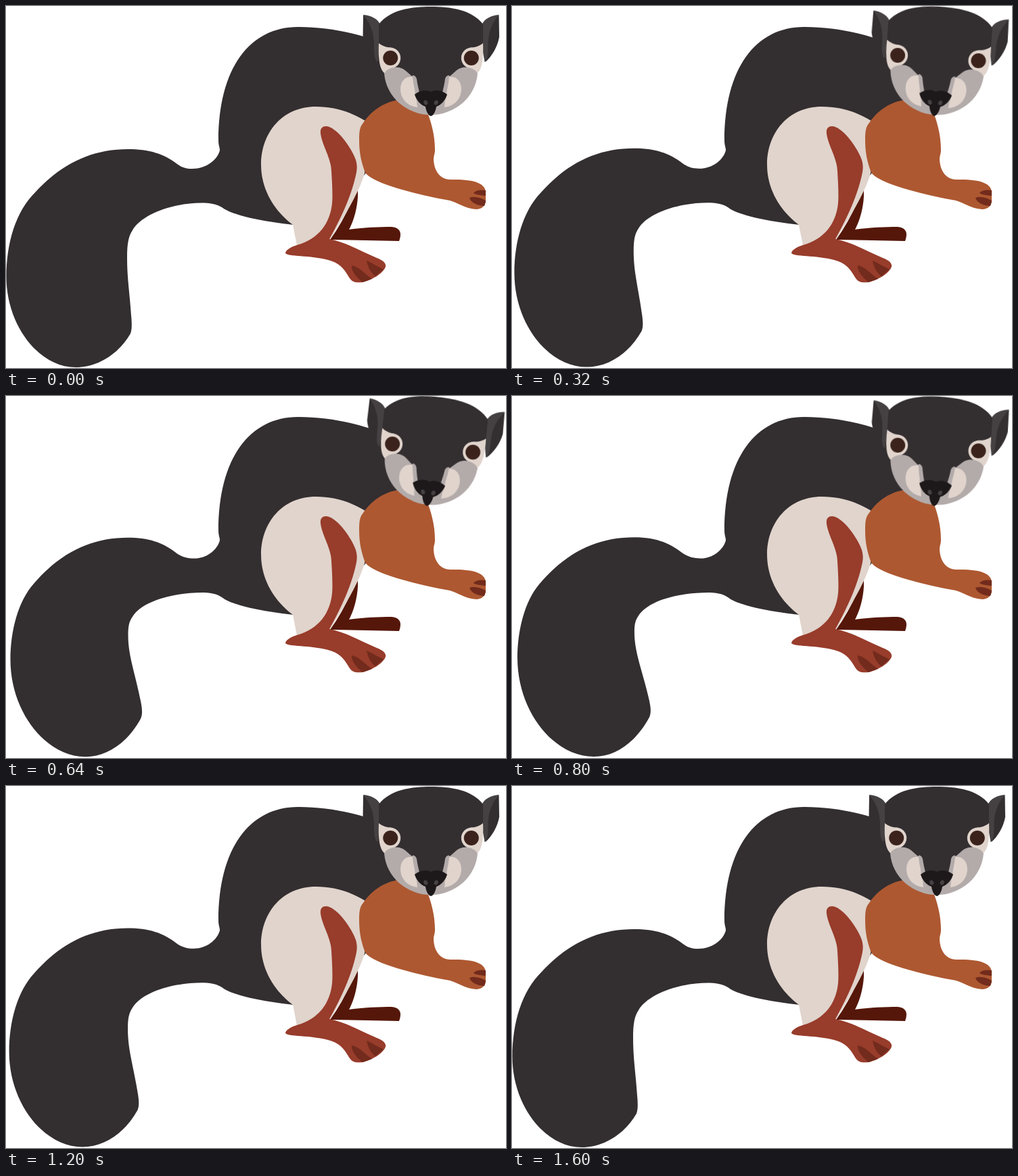
An HTML page that plays this animation: 739x536 px, repeating every 1.72 s.

```html
<!DOCTYPE html>
<html lang="en">
<head>
<meta charset="utf-8">
<title>Squirrel</title>
<style>
  html, body { margin: 0; width: 100%; height: 100%; overflow: hidden; background: #fff; }
  svg { display: block; width: 739px; height: 536px; }

  .dark { fill: #332e30; }
  .grey { fill: #454142; }
  .cream { fill: #e0d4cc; }
  .cheek { fill: #b3abaa; }
  .rust { fill: #983c2b; }
  .claw { fill: #722b1c; }
  .shade { fill: #551709; }
  .orange { fill: #ad5831; }
  .iris { fill: #3b231c; }
  .nose { fill: #1d1819; }

  /* 25 poses per second, stepped */
  #tail {
    d: path("M316 214C312 228 296 241 275 241C266 241 260 239 253 234C234 219 212 212 180 212C126 212 82 234 44 275C14 304 .5 352 .5 401C.5 472 48 535 103 535C135 535 166 516 184 485C186 479 186 474 185.5 464C183 425 179 405 179 372C179 352 181 341 187 332C200 309 246 291 292 291.5C306 292 314 295 319 298L330 296L340 220Z");
    animation: wag 1720ms infinite;
  }
  #head { transform-origin: 628px 103px; animation: tilt 1720ms infinite; }

  @keyframes wag {
    0% { animation-timing-function: steps(21); }
    48.837% {
      d: path("M316 214C312 228 297 240.5 279 240.5C268 240.5 259 238 250 231C231 216 210 209 180 209C126 209 80 231 40 279C19 304 8.4 347 8.4 387C8.4 466 62 534 122 534C155 534 185 511 204 475C207 468 206 460 203.5 449C194 408 181 379 181 349C181 338 182 332 187 325C201 303 245 291 292 291C306 291.5 314 294.5 319 298L330 296L340 220Z");
      animation-timing-function: steps(19);
    }
    93.023%, 100% {
      d: path("M316 214C312 228 296 241 275 241C266 241 260 239 253 234C234 219 212 212 180 212C126 212 82 234 44 275C14 304 .5 352 .5 401C.5 472 48 535 103 535C135 535 166 516 184 485C186 479 186 474 185.5 464C183 425 179 405 179 372C179 352 181 341 187 332C200 309 246 291 292 291.5C306 292 314 295 319 298L330 296L340 220Z");
    }
  }
  @keyframes tilt {
    0% { transform: rotate(0deg); animation-timing-function: steps(14); }
    32.558% { transform: rotate(6.7deg); animation-timing-function: steps(15); }
    67.441%, 100% { transform: rotate(0deg); }
  }
</style>
</head>
<body>
<svg viewBox="0 0 739 536">
  <defs>
    <g id="ear">
      <path class="dark" d="M528 13L527.5 46C530 60 538 74 548 83L546 30Z"/>
      <path class="grey" d="M528 13C540 14 549 19 553 27L553 60L549 83C545 80 544 72 544 60C544 40 540 28 528 13Z"/>
    </g>
    <g id="side">
      <path class="cream" d="M551 55C556 59 562 61.5 569 61.5L574 91L560 100C552 94 550 78 551 55Z"/>
      <circle class="cream" cx="567.7" cy="77" r="15.5"/>
      <circle class="iris" cx="568.2" cy="77" r="11"/>
      <path class="cheek" d="M559 100C564 90 582 87 592 97L600 104C602 101 606 104 607 108C608 116 610 123 611 128L629 140V161.5C592 161 562 135 559 100Z"/>
      <path class="cream" d="M601 105C590 103 583 112 583 123C583 136 592 148 608 150L607 140L604 131C606 128 602 118 601 105Z"/>
    </g>
  </defs>

  <path id="tail" class="dark"/>
  <path class="dark" d="M560 56C525 42 480 31 432 31C360 31 314 92 314 200C314 206 316 209 316 214L319 298C334 310 380 319 425 324L530 250L600 140Z"/>

  <path class="shade" d="M520 266V282C519 300 514 318 507 331C530 328 552 327 570 327C579 328 583 332 583 338C583 342 582 345 581 348L479 346C496 322 510 295 520 266Z"/>
  <path class="cream" d="M531 170C508 156 484 149 458 149C408 149 377 188 377 235C377 275 400 306 424 324L430 355L479 346C497 314 518 286 530 248Z"/>
  <path class="rust" d="M473 178C467 178 464 182 465 189C467 206 481 226 481 245C482 262 483 280 482 292C479 322 462 345 430 354C420 357 413 362 413 366C415 371 450 369 476 376C492 380 499 388 506 400C511 409 516 410 527 409C543 405 558 395 561 386C562 381 558 377 548 373C525 363 503 350 478 345C499 307 512 276 518 246C519 240 519 235 517 228C508 204 486 178 473 178Z"/>
  <path class="claw" d="M511 384C510 392 518 402 527 409L541 404C531 398 524 387 511 384ZM533 377C535 388 540 396 546 400L558 390C550 386 543 382 533 377Z"/>

  <path class="orange" d="M528 173C538 158 555 143 580 139L622 155C628 171 634 190 634 213C634 219 632 221 632 228C633 245 642 257 657 257C690 256 709 262 709 276V287C709 296 703 301 695 301C678 300 668 291 656 288C617 281 545 265 531 247C524 228 522 215 522 198C522 185 523 179 528 173Z"/>
  <path class="claw" d="M691 277C695 272 703 272 709 273V281C702 280 695 280 691 277ZM685 284C692 281 702 284 709 288C709 291 708 293 707 296C699 296 687 292 685 284Z"/>

  <g id="head">
    <use href="#ear"/>
    <use href="#ear" transform="translate(1256.5) scale(-1 1)"/>
    <path class="dark" d="M551 27C568 5 600 1 628 1S688 5 705 27V57L690 100L640 140H616L566 100L551 57Z"/>
    <use href="#side"/>
    <use href="#side" transform="translate(1256) scale(-1 1)"/>
    <path class="nose" d="M604 131C611 125 621 123 628 127C635 123 645 125 652 131C649 140 644 146 636 149C635 156 632 162 628 163C624 162 621 156 620 149C612 146 607 140 604 131Z"/>
    <ellipse class="grey" cx="620.3" cy="143" rx="3" ry="3.6" transform="rotate(-20 620.3 143)"/>
    <ellipse class="grey" cx="635.7" cy="143" rx="3" ry="3.6" transform="rotate(20 635.7 143)"/>
  </g>
</svg>
</body>
</html>
```
